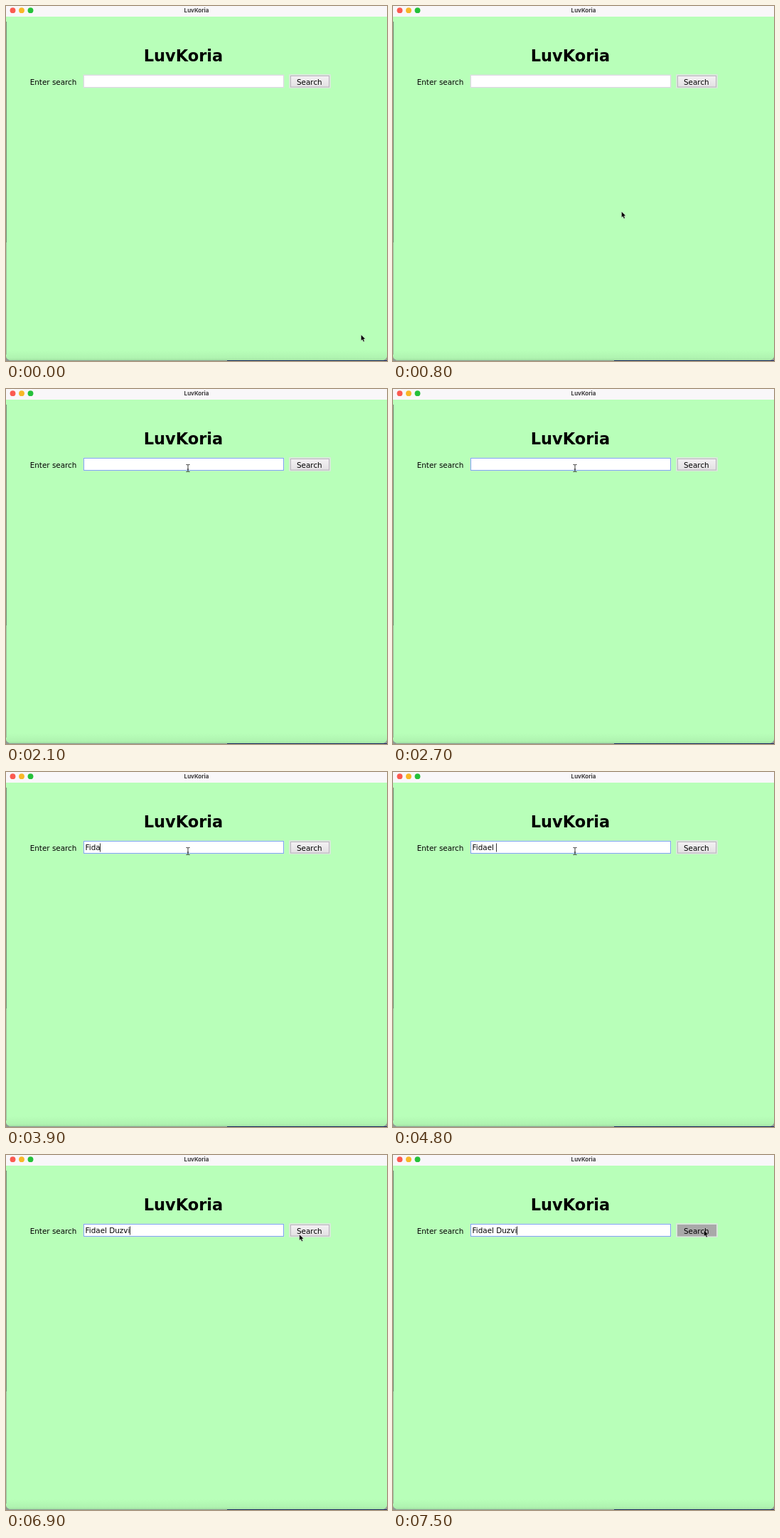
These frames come from a looping animation (536x500 px, 8000 ms). An HTML page:

```html
<!DOCTYPE html>
<html lang="en">
<head>
<meta charset="utf-8">
<title>LuvKoria</title>
<style>
  html, body { margin: 0; width: 100%; height: 100%; overflow: hidden; background: #8f9992; }
  svg { display: block; width: 536px; height: 500px; }
  text { font-family: "DejaVu Sans", Verdana, sans-serif; font-size: 10.4px; white-space: pre; }
  .bar { font: 700 8px Inter, "Liberation Sans", sans-serif; fill: #3c3a3c; text-anchor: middle; }
  .title { font-size: 22.5px; font-weight: bold; text-anchor: middle; }
</style>
</head>
<body>
<svg viewBox="0 0 536 500">
  <defs>
    <linearGradient id="foot" x1="0" y1="0" x2="0" y2="1">
      <stop offset="0" stop-color="#b8ffb9"/>
      <stop offset=".8" stop-color="#aff3b0"/>
      <stop offset="1" stop-color="#a0dea2"/>
    </linearGradient>
    <linearGradient id="face" x1="0" y1="0" x2="0" y2="1">
      <stop offset="0" stop-color="#f3f1f3"/>
      <stop offset="1" stop-color="#e3e1e3"/>
    </linearGradient>
  </defs>

  <!-- desktop showing below the window -->
  <rect y="480" width="536" height="20" fill="#8f9992"/>
  <rect x="311" y="499" width="225" height="1" fill="#1b2460"/>

  <!-- window -->
  <path d="M0 0H536V491Q536 499 528 499H8Q0 499 0 491Z" fill="#b8ffb9"/>
  <path d="M0 485H536V491Q536 499 528 499H8Q0 499 0 491Z" fill="url(#foot)"/>
  <rect y="22" width="1" height="311" fill="#75907a"/>
  <rect y="333" width="1" height="158" fill="#9cc2a0"/>
  <rect width="536" height="15" fill="#f9f7f9"/>
  <circle cx="9.5" cy="6.2" r="3.9" fill="#fb5a50"/>
  <circle cx="22" cy="6.2" r="3.9" fill="#f8b727"/>
  <circle cx="34.5" cy="6.2" r="3.9" fill="#25c03a"/>
  <text class="bar" x="268" y="9">LuvKoria</text>

  <!-- page -->
  <text class="title" x="249.5" y="78">LuvKoria</text>
  <text x="33.7" y="111">Enter search</text>
  <rect x="108.5" y="96.5" width="283" height="19" fill="#d3f0d8"/>
  <rect id="field" x="109.5" y="97.5" width="281" height="17" fill="#fff"/>
  <text id="typed" x="111.6" y="110"></text>
  <rect id="caret" y="100.5" width="1" height="12" fill="#333"/>
  <rect x="398" y="96" width="59" height="20" rx="1" fill="#d8e8da"/>
  <rect id="button" x="400.5" y="98.5" width="54" height="15.5"/>
  <text x="409" y="111">Search</text>

  <!-- pointers, drawn around their hot spots -->
  <path id="arrow" d="M0 0V8.4L1.9 6.7L3.3 9.9L4.8 9.2L3.5 6.2L6 6Z"
        fill="#000" stroke="#fff" stroke-opacity=".6" stroke-width=".6"/>
  <path id="beam" d="M-2.5 -5H-.9L0 -4.3L.9 -5H2.5M0 -4.3V4.3M-2.5 5H-.9L0 4.3L.9 5H2.5M-1.2 1.5H1.2"
        fill="none" stroke="#222" stroke-width=".9"/>
</svg>
<script>
const LOOP = 8000, TICK = 100;
const QUERY = "Fidael Duzvi";
const FOCUS = 2100, TYPE = 3000, KEY = 300, BLINK = 450, PRESS = 7400;

const HOME = [499.5, 463];
const MOVES = [
  { from: 0, to: 500, goal: [371.5, 332.5] },
  { from: 700, to: 800, goal: [321.5, 289.5] },
  { from: 800, to: 1000, goal: [267.5, 168.5] },
  { from: 1100, to: 1700, goal: [254, 118] },
  { from: 1700, to: 2000, goal: [256, 111.5] },
  { from: 6500, to: 7100, goal: [465, 112] },
  { from: 7100, to: 7400, goal: [437.5, 106] }
];

const [field, typed, caret, button, arrow, beam] =
  ["field", "typed", "caret", "button", "arrow", "beam"].map(id => document.getElementById(id));
const show = (el, on) => el.setAttribute("visibility", on ? "visible" : "hidden");
const easeInOut = p => (1 - Math.cos(Math.PI * p)) / 2;

function pointer(t) {
  return MOVES.reduce((pos, { from, to, goal }) => {
    const p = easeInOut(Math.min(1, Math.max(0, (t - from) / (to - from))));
    return pos.map((v, i) => v + (goal[i] - v) * p);
  }, HOME);
}

// An even typing rhythm with one extra beat between the words
const keyTime = i => TYPE + KEY * (i > QUERY.indexOf(" ") ? i + 1 : i);

function drawPointer(t) {
  const [x, y] = pointer(t);
  const overField = x > 109 && x < 391 && y > 97 && y < 115;
  for (const el of [arrow, beam]) el.setAttribute("transform", `translate(${x} ${y})`);
  show(arrow, !overField);
  show(beam, overField);
}

function drawField(t) {
  const text = [...QUERY].filter((_, i) => keyTime(i) <= t).join("");
  if (typed.textContent !== text) typed.textContent = text;
  field.setAttribute("stroke", t >= FOCUS ? "#7fa5f2" : "#ddd6e2");

  const lastInput = text ? keyTime(text.length - 1) : FOCUS + TICK;
  const width = text ? typed.getComputedTextLength() : 0;
  caret.setAttribute("x", Math.round(111.4 + width));
  show(caret, t >= lastInput && Math.floor((t - lastInput) / BLINK) % 2 === 0);
}

function drawButton(t) {
  const pressed = t >= PRESS;
  button.setAttribute("fill", pressed ? "#a9a9a9" : "url(#face)");
  button.setAttribute("stroke", pressed ? "#a9a6aa" : "#bdb2c0");
}

const start = performance.now();
function frame() {
  const now = (performance.now() - start) % LOOP;
  const t = Math.floor(now / TICK) * TICK;
  drawPointer(t);
  drawField(t);
  drawButton(t);
  requestAnimationFrame(frame);
}
frame();
</script>
</body>
</html>
```
